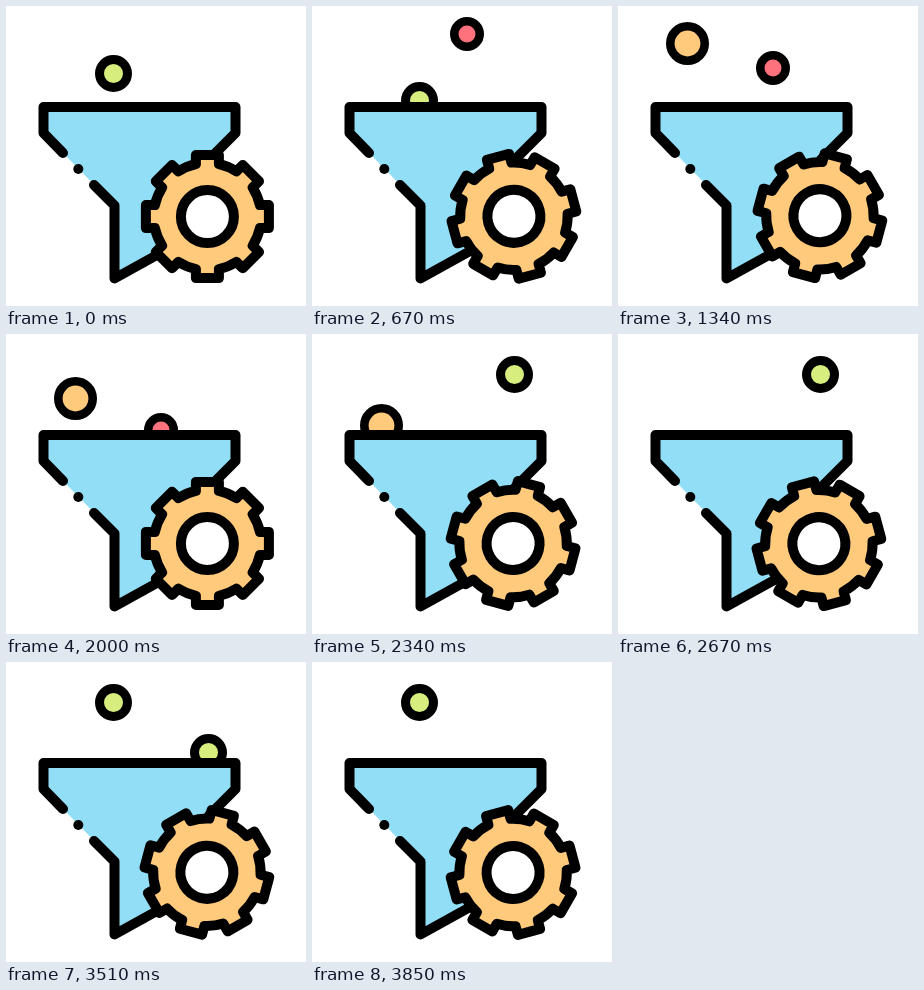
An HTML page for the animation above (4020 ms loop, 300x300 px).

```html
<!DOCTYPE html>
<html lang="en">
<head>
<meta charset="utf-8">
<title>Filter and gear</title>
<style>
  html, body { margin: 0; height: 100%; overflow: hidden; background: #fff; }
  svg { display: block; width: 100%; height: 100%; }
  .line { fill: none; stroke: #000; stroke-width: 10; stroke-linecap: round; stroke-linejoin: round; }
</style>
</head>
<body>
<svg viewBox="0 0 300 300">
  <g id="balls" stroke="#000"></g>
  <path fill="#92def6" d="M37.5 101H229.5V127L158.5 198V245L108.5 272.5V199.5L37.5 127Z"/>
  <path class="line" d="M57 147L37.5 127V101H229.5V127L203 153.5M88 179L108.5 199.5V272.5L160 244"/>
  <circle cx="72.3" cy="163" r="5"/>
  <g id="gear">
    <path id="teeth" class="line" style="fill:#ffca7c"/>
    <circle class="line" r="26.5" style="fill:#fff"/>
  </g>
</svg>
<script>
const LOOP = 4020;
const TICKS = [0, 170, 330, 500, 670, 840, 1000, 1170, 1340, 1500, 1670, 1840,
  2000, 2170, 2340, 2500, 2670, 2840, 3010, 3180, 3340, 3510, 3680, 3850];
const PIVOT = "201.4 210";
const $ = id => document.getElementById(id);

// Each ball appears at its start tick, drops twice, then is gone.
const balls = [
  { x: 107.5, y: 40.5, drop: 27, r: 14, w: 9, fill: "#d7ee7e", start: 21 },
  { x: 155, y: 28, drop: 34, r: 12.75, w: 8.5, fill: "#fd727d", start: 4 },
  { x: 69.5, y: 37.5, drop: 27, r: 17.2, w: 8.6, fill: "#ffca7c", start: 7 },
  { x: 202.5, y: 40.5, drop: 25, r: 14, w: 9, fill: "#d7ee7e", start: 14 }
];
for (const b of balls) {
  b.el = document.createElementNS("http://www.w3.org/2000/svg", "circle");
  const attrs = { cx: b.x, r: b.r, fill: b.fill, "stroke-width": b.w };
  for (const k in attrs) b.el.setAttribute(k, attrs[k]);
  $("balls").append(b.el);
}

function gearPath() {
  const half = 11.5, tip = 61.5, root = 52.5;
  let d = "";
  for (let i = 0; i < 8; i++) {
    const a = i * Math.PI / 4, c = Math.cos(a), s = Math.sin(a);
    const at = (x, y) => `${(x * c - y * s).toFixed(2)} ${(x * s + y * c).toFixed(2)}`;
    d += (i ? "A54 54 0 0 1 " : "M") + at(-half, -root) +
      "L" + at(-half, -tip) + "L" + at(half, -tip) + "L" + at(half, -root);
  }
  return d + "A54 54 0 0 1 " + `${-half} ${-root}Z`;
}
$("teeth").setAttribute("d", gearPath());

function draw(now) {
  const t = now % LOOP;
  const tick = TICKS.filter(x => x <= t).length - 1;
  for (const b of balls) {
    const step = Math.floor((tick - b.start + 24) % 24 / 3);
    b.el.setAttribute("cy", b.y + b.drop * step);
    b.el.setAttribute("visibility", step < 3 ? "visible" : "hidden");
  }
  // The gear sits slightly off its pivot, so it wobbles as it turns.
  const angle = -30 * Math.floor(tick / 2);
  $("gear").setAttribute("transform", `translate(${PIVOT}) rotate(${angle}) translate(0 .6)`);
}

const begin = performance.now();
function loop() {
  draw(performance.now() - begin);
  requestAnimationFrame(loop);
}
loop();
</script>
</body>
</html>
```
